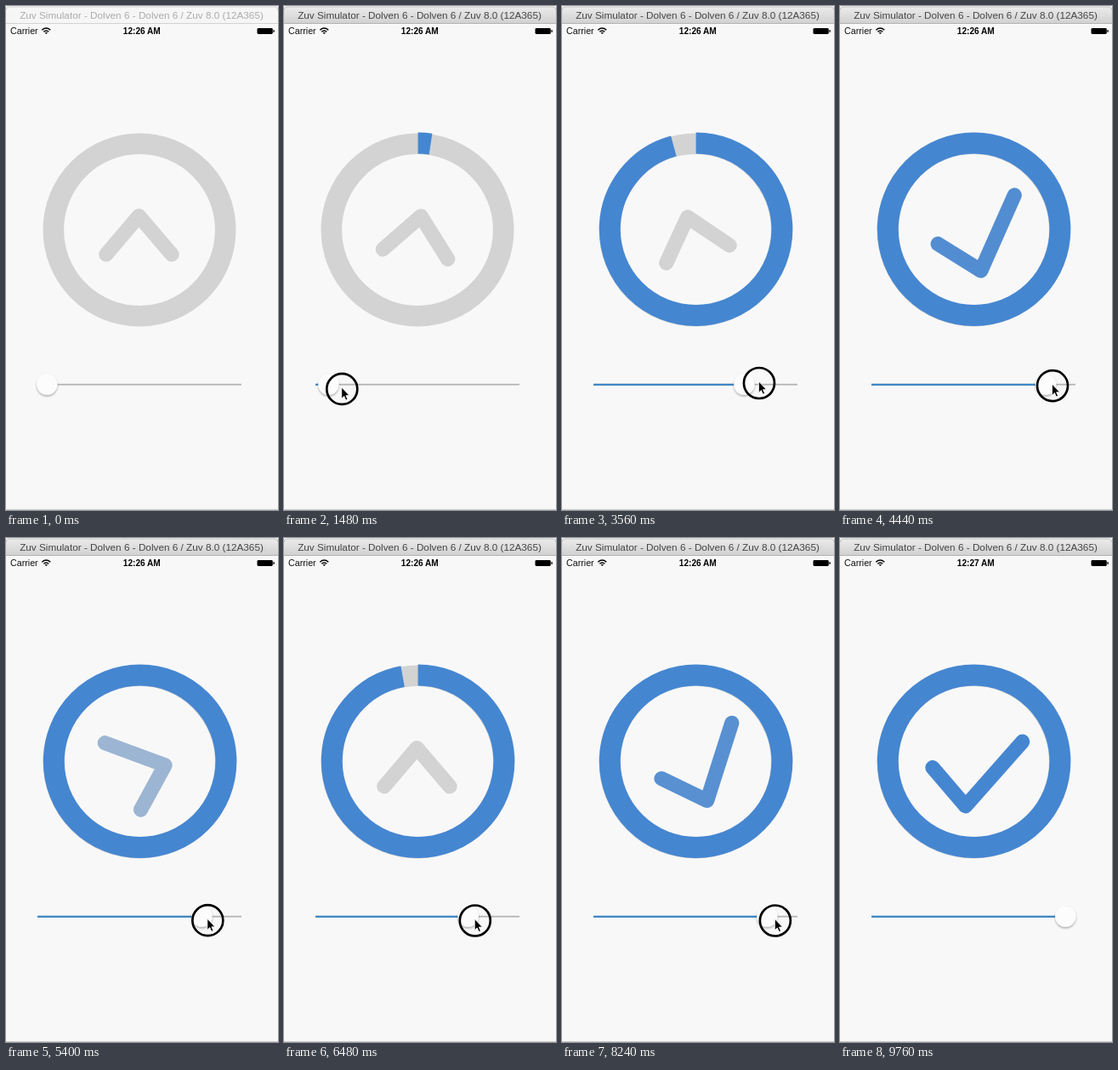
Write an HTML page that moves like this. It is 320 px wide and 592 px high and loops after 9.8 s.

```html
<!DOCTYPE html>
<html lang="en">
<head>
<meta charset="utf-8">
<title>Slider check</title>
<style>
html, body { margin: 0; width: 100%; height: 100%; overflow: hidden; background: #f8f8f8; }
svg { display: block; width: 320px; height: 592px; }
text { font-family: "Liberation Sans", Arial, sans-serif; }
</style>
</head>
<body>
<svg viewBox="0 0 320 592">
  <defs>
    <linearGradient id="bar" x1="0" y1="0" x2="0" y2="1">
      <stop offset="0" stop-color="#ebebeb"/><stop offset="1" stop-color="#d0d0d0"/>
    </linearGradient>
    <filter id="shade" x="-50%" y="-50%" width="200%" height="200%">
      <feDropShadow dx="0" dy="1.5" stdDeviation="1.3" flood-color="#000" flood-opacity=".35"/>
    </filter>
  </defs>
  <rect width="320" height="592" fill="#f8f8f8"/>
  <path id="top" d="M0 21V5Q0 1 4 1H316Q320 1 320 5V21Z"/>
  <path id="edge" d="M0 5Q0 1 4 1H316Q320 1 320 5" fill="none"/>
  <path id="rule" d="M0 20.5H320"/>
  <path d="M0 591.5H320" stroke="#c8c8c8"/>
  <text id="name" x="159.5" y="15.4" font-size="11.75" text-anchor="middle">Zuv Simulator - Dolven 6 - Dolven 6 / Zuv 8.0 (12A365)</text>

  <text x="5" y="33" font-size="10.7" fill="#111">Carrier</text>
  <g fill="none" stroke="#000" stroke-width="1.5">
    <path d="M42.3 28.2Q47.3 23.8 52.3 28.2"/>
    <path d="M44.3 30.3Q47.3 27.6 50.3 30.3"/>
    <path d="M46 31.3L47.3 32.8L48.6 31.3Z" fill="#000" stroke-width=".6"/>
  </g>
  <text id="clock" x="159.8" y="33" font-size="10.1" font-weight="700" text-anchor="middle"></text>
  <rect x="295.5" y="26.1" width="18.3" height="6.8" rx="1.4"/>
  <rect x="314.4" y="28" width="1.4" height="3" rx=".7"/>

  <g fill="none">
    <circle cx="157" cy="263" r="101.2" stroke="#d3d3d3" stroke-width="24.6"/>
    <circle id="arc" cx="157.6" cy="262.3" r="101.3" stroke="#4586d1" stroke-width="25" transform="rotate(-90 157.6 262.3)"/>
    <path id="mark" stroke-width="17.2" stroke-linecap="round" stroke-linejoin="round"/>
    <path d="M37 444.7H277" stroke="#b2b2b2" stroke-width="1.7"/>
    <path id="fill" stroke="#2f7fc4" stroke-width="1.9"/>
  </g>
  <circle id="thumb" cy="444.5" r="12.2" fill="#fcfcfc" filter="url(#shade)"/>
  <g id="pointer">
    <circle id="halo" r="18" fill="none" stroke="#000" stroke-width="2.7"/>
    <path d="M-.5-2V11.2L2.4 8.4L4.5 13L6.6 12L4.6 7.6H8.6Z" stroke="#fff" stroke-width=".8"/>
  </g>
</svg>
<script>
const LOOP = 9800, STEP = 40;
const ENTER = 800, PRESS = 1400, FULL = 4440, RELEASE = 8880, MINUTE = 9000, LEAVE = 9280;
const FULL_AT = 0.8, CHECK_SPAN = 0.103, LAG = 62;
const GREY = [211, 211, 211], BLUE = [69, 134, 209];

// turning points of the drag: time, slider value
const TURNS = [
  [PRESS, 0], [2000, .39], [2600, 0], [3860, .893],
  [FULL, .893], [6480, .776], [8200, .888], [8800, 1]
];

const el = id => document.getElementById(id);
const set = (id, attrs) => {
  for (const k in attrs) el(id).setAttribute(k, attrs[k]);
};
const clamp = x => Math.max(0, Math.min(1, x));
const mix = (a, b, k) => a.map((x, i) => x + (b[i] - x) * k);
const ease = (t, from, to) => {
  const u = clamp((t - from) / (to - from));
  return u * u * (3 - 2 * u);
};

// each turning point adds one eased move
const value = t => TURNS.slice(1).reduce((v, [time, to], i) =>
  v + (to - TURNS[i][1]) * ease(t, TURNS[i][0], time), 0);
const thumbX = t => 48.3 + 217 * value(t);

// the thumb trails the pointer by LAG
function pointerAt(t) {
  const out = ease(t, RELEASE, LEAVE);
  const lift = Math.exp(-(((t - 3600) / 1050) ** 2));
  return [
    thumbX(t + LAG) + 8 + 47 * out,
    449.5 - 6.5 * lift + 9 * (1 - ease(t, ENTER, PRESS + 200)) + 46 * out
  ];
}

// chevron that turns about one point and stretches into a check
function markPath(deg, grow, shift) {
  const ax = -.7 + 10 * shift, ay = -32.4 - 3.5 * shift;
  const c = Math.cos(deg * Math.PI / 180), s = Math.sin(deg * Math.PI / 180);
  const pts = [[ax - 38.5 - 28.5 * grow, ay + 45.2 + 30.5 * grow], [ax, ay], [ax + 38.8, ay + 45.2]];
  return "M" + pts.map(([x, y]) =>
    `${(157 + x * c - y * s).toFixed(2)} ${(279 + x * s + y * c).toFixed(2)}`).join("L");
}

function draw(t) {
  const v = value(t), x = thumbX(t);
  const on = t >= PRESS;
  set("top", { fill: on ? "url(#bar)" : "#f6f6f6" });
  set("edge", { stroke: on ? "#c2c2c2" : "#d4d4d4" });
  set("rule", { stroke: on ? "#b3b3b3" : "#d2d2d2" });
  set("name", { fill: on ? "#444" : "#ababab" });
  el("clock").textContent = t < MINUTE ? "12:26 AM" : "12:27 AM";

  const ring = clamp(v / FULL_AT), q = clamp((v - FULL_AT) / CHECK_SPAN);
  const len = 2 * Math.PI * 101.3;
  set("arc", {
    "stroke-dasharray": ring < 1 ? `${ring * len} ${len}` : "none",
    visibility: ring > 0 ? "visible" : "hidden"
  });
  // the chevron only follows the ring until the first full turn
  const turn = q > 0 ? 180 * q : t < FULL ? 360 * ring : 0;
  set("mark", {
    d: markPath(turn, q, clamp((q - .88) / .12)),
    stroke: `rgb(${mix(GREY, BLUE, q).map(Math.round)})`
  });

  set("fill", { d: `M37 444.7H${x}` });
  set("thumb", { cx: x });
  set("pointer", {
    transform: `translate(${pointerAt(t)})`,
    visibility: t >= ENTER && t < LEAVE ? "visible" : "hidden"
  });
  set("halo", { opacity: on && t < RELEASE ? 1 : 0 });
}

const start = performance.now();
function tick() {
  const t = (performance.now() - start) % LOOP;
  draw(Math.floor(t / STEP) * STEP);
  requestAnimationFrame(tick);
}
draw(0);
requestAnimationFrame(tick);
</script>
</body>
</html>
```
